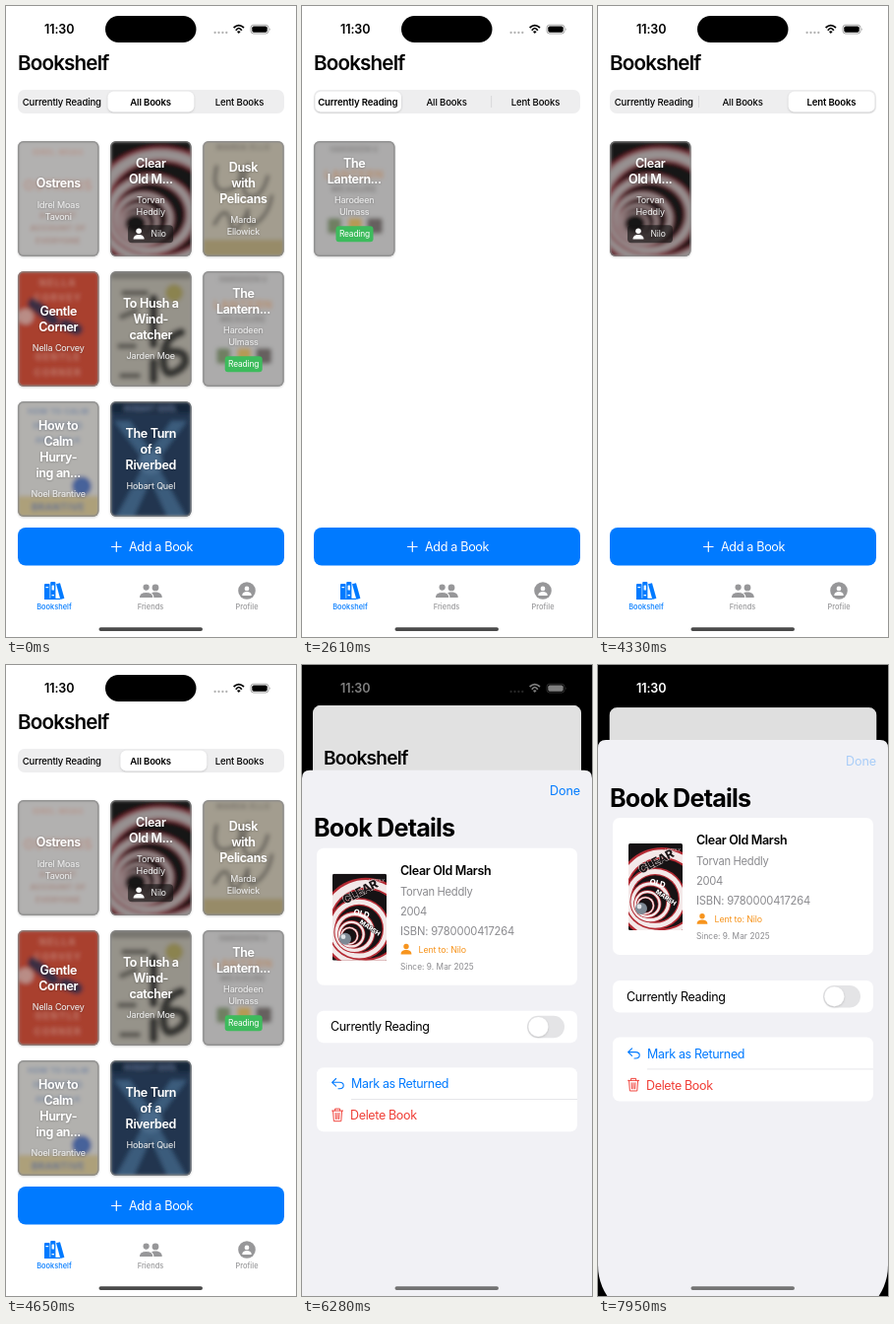
Animation of 295x640 px, one loop 8 s. Source, as an HTML page:

```html
<!DOCTYPE html>
<html lang="en">
<head>
<meta charset="utf-8">
<title>Bookshelf</title>
<style>
html, body { margin: 0; width: 100%; height: 100%; overflow: hidden; background: #000; }
svg { display: block; width: 100%; height: 100%; }
text { font-family: Inter, "Liberation Sans", sans-serif; white-space: pre; }
</style>
</head>
<body>
<svg id="stage" viewBox="0 0 295 640"></svg>
<script>
const BLUE = '#007aff', GRAY = '#8a8a8e', TAB = '#979799';

const rect = (x, y, w, h, fill, r = 0, more = '') =>
  `<rect x="${x}" y="${y}" width="${w}" height="${h}" rx="${r}" fill="${fill}" ${more}/>`;
const circle = (x, y, r, fill) => `<circle cx="${x}" cy="${y}" r="${r}" fill="${fill}"/>`;
const path = (d, fill, more = '') => `<path d="${d}" fill="${fill}" ${more}/>`;
const line = (d, stroke, w = 1) =>
  path(d, 'none', `stroke="${stroke}" stroke-width="${w}" stroke-linecap="round" stroke-linejoin="round"`);

function text(x, y, size, str, { fill = '#000', weight = 400, anchor = 'start', track, more = '' } = {}) {
  track ??= size > 10 ? -.027 : -.016;
  return `<text x="${x}" y="${y}" font-size="${size}" font-weight="${weight}" fill="${fill}" ` +
    `text-anchor="${anchor}" letter-spacing="${track}em" ${more}>${str}</text>`;
}

const person = (x, y, s, fill) => `<g transform="translate(${x} ${y}) scale(${s})">` +
  circle(0, -2.8, 2.7, fill) + path('M-5.4 5.2C-5.4 2-3 .8 0 .8S5.4 2 5.4 5.2Z', fill) + '</g>';

// Cover art in an 82.5 x 117 box
const words = (fill, rows, track = .04) => rows.map(([y, size, str]) =>
  text(41, y, size, str, { fill, weight: 700, anchor: 'middle', track })).join('');

// Nested bands that shrink toward the lower left
function swirl(light, red, dark) {
  let s = rect(0, 0, 55, 88, dark);
  for (let i = 0; i < 5; i++) {
    const r = 47 * .67 ** i, x = 13 + 21 * .67 ** i, y = 66 - 15 * .67 ** i;
    s += circle(x, y, r, red) + circle(x, y, r * .95, light) +
      circle(x, y, r * .79, red) + circle(x, y, r * .75, dark);
  }
  return s;
}

const art = {
  bones: rect(0, 0, 83, 117, '#b2b1b0') +
    words('#b5958b', [[14, 8, 'IDREL MOAS'], [50, 14, 'OSTRENS']]) +
    words('#a6877e', [[78, 8, 'A SHORT'], [91, 8, 'ACCOUNT OF'], [104, 8, 'EVERYONE']]),
  rings: '<g transform="scale(1.5 1.33)">' + swirl('#979191', '#7d2631', '#181617') + '</g>',
  reeds: rect(0, 0, 83, 117, '#a39d8f') + rect(0, 100, 83, 17, '#978b68') +
    words('#77726a', [[9, 8, 'MARDA ELLO']]) +
    line('M14 26q-6 26 10 24t14-22M46 24q-10 30 2 32t18-20M12 84q12-22 16-2t18-12q-2 22 10 12t14-26', '#6a665f', 4),
  brick: rect(0, 0, 83, 117, '#a93f2e') + circle(8, 46, 8, '#b98d86') +
    line('M16 33l20 17M48 54l12 5', '#3b2d42', 12) +
    words('#c27a6b', [[15, 9, 'NELLA'], [30, 9, 'CORVEY'], [90, 9, 'GENTLE'], [106, 9, 'CORNER']], .2),
  ink: rect(0, 0, 83, 117, '#96938a') + rect(0, 0, 83, 8, '#77756e') + circle(65, 22, 9, '#8b8350') +
    line('M14 22h22M12 46l14-6M10 76h14M12 106h16', '#5f5d57', 6) +
    line('M44 28v46M44 92v18M72 62Q54 68 54 88t12 14 10-14-18-6', '#393834', 9),
  coins: rect(0, 0, 83, 117, '#acabab') +
    words('#7d7b7a', [[11, 7, 'HARODEEN U']]) + words('#b5906f', [[38, 12, 'LANTERN']]) +
    words('#817f7e', [[52, 9, 'MEASURE']]) + rect(14, 78, 14, 16, '#6f7f62', 3) +
    rect(35, 78, 14, 16, '#b59a55', 3) + rect(54, 78, 16, 16, '#66615e', 3),
  calm: rect(0, 0, 83, 117, '#b2b1ae') +
    words('#7788a3', [[13, 8, 'HOW TO CALM'], [28, 9, 'HURRYING'], [42, 8, 'AND WALK']]) +
    circle(65, 86, 10, '#47629a') + rect(0, 96, 83, 21, '#ada07a') +
    words('#5f7194', [[111, 10, 'BRANTIVE']]),
  night: rect(0, 0, 83, 117, '#20344f') + path('M4 20L36 62 6 117H24L41 80 58 117H77L46 62 78 20H62L41 50 20 20Z', '#3b5b7c') +
    circle(41, 62, 12, '#4a6b8b') + rect(0, 0, 83, 12, '#18263b') +
    words('#5d7396', [[10, 7, 'HOBART QUEL']])
};

const books = [
  { title: ['Ostrens'], by: ['Idrel Moas', 'Tavoni'], art: 'bones' },
  { title: ['Clear', 'Old M...'], by: ['Torvan', 'Heddly'], art: 'rings', lent: 'Nilo' },
  { title: ['Dusk', 'with', 'Pelicans'], by: ['Marda', 'Ellowick'], art: 'reeds' },
  { title: ['Gentle', 'Corner'], by: ['Nella Corvey'], art: 'brick' },
  { title: ['To Hush a', 'Wind-', 'catcher'], by: ['Jarden Moe'], art: 'ink' },
  { title: ['The', 'Lantern...'], by: ['Harodeen', 'Ulmass'], art: 'coins', reading: true },
  { title: ['How to', 'Calm', 'Hurry-', 'ing an...'], by: ['Noel Brantive'], art: 'calm' },
  { title: ['The Turn', 'of a', 'Riverbed'], by: ['Hobart Quel'], art: 'night' }
];

function card(book, i) {
  const { title, by, lent, reading } = book, badge = lent || reading;
  const lead = 15.7, small = 12, cx = 41.2;
  let y = (117 - title.length * lead - 8 - by.length * small - (badge ? 24 : 0)) / 2;
  let s = `<g transform="translate(${12 + 94.1 * (i % 3)} ${137 + 132 * Math.floor(i / 3)})">` +
    rect(0, 0, 82.5, 117, '#999', 6, 'filter="url(#soft)"') +
    `<g clip-path="url(#cardClip)"><g filter="url(#blur)">${art[book.art]}</g>` +
    rect(0, 0, 82.5, 117, 'none', 6, 'stroke="#858585" stroke-width="3" opacity=".6"') + '</g>';
  const put = (rows, step, size, fill, weight) => rows.forEach(row => {
    s += text(cx, y + step / 2 + size * .36, size, row,
      { fill, weight, anchor: 'middle', more: 'filter="url(#glow)"' });
    y += step;
  });
  put(title, lead, 12.5, '#fff', 600);
  y += 8;
  put(by, small, 9, '#ececec', 400);
  y += 8;
  if (reading) {
    s += rect(22.5, y, 38, 16, '#3dbb5c', 3) +
      text(41.5, y + 11, 8.4, 'Reading', { fill: '#fff', anchor: 'middle' });
  }
  if (lent) {
    s += rect(18, y - 1, 46, 18, '#161414', 4, 'opacity=".65"') + person(29, y + 8, 1.02, '#fff') +
      text(41.5, y + 11.2, 8.6, lent, { fill: '#f2f2f2' });
  }
  return s + '</g>';
}

const shelves = [books.filter(b => b.reading), books, books.filter(b => b.lent)];
const segX = i => 13.4 + 90.2 * i;

const tabs = rect(39, 586, 5.6, 16, BLUE, 1) + rect(45.2, 584, 5.2, 18, BLUE, 1) +
  rect(40.4, 589, 2.8, 1.2, '#fff') + rect(46.6, 587.5, 2.4, 5, '#fff', .6) + rect(46.6, 597, 2.4, 1.3, '#fff') +
  path('M51 586.2l4-1 4.4 15.6-4 1.1Z', BLUE) + rect(39, 600.8, 16, 1.2, BLUE) +
  person(152, 593.4, 1.25, TAB) +
  `<g stroke="#fff" stroke-width=".8">${person(142.6, 593.4, 1.35, TAB)}</g>` +
  circle(245, 593, 8.8, TAB) + person(245, 593.4, .88, '#fff') +
  [['Bookshelf', 49, BLUE], ['Friends', 147, TAB], ['Profile', 245, TAB]].map(([s, x, fill]) =>
    text(x, 612.4, 7.4, s, { fill, weight: 500, anchor: 'middle', track: .005 })).join('');

const home = rect(0, 0, 295, 640, '#fff') +
  text(12, 65, 20.6, 'Bookshelf', { weight: 600, track: -.04 }) +
  rect(12, 85, 271, 24, '#eeeeef', 7) +
  [0, 1].map(i => rect(102 + 90.3 * i, 91, .8, 12, '#d2d2d5', 0, `id="rule${i}"`)).join('') +
  rect(0, 86.8, 87.6, 20.4, '#fff', 5.5, 'id="pill" filter="url(#soft)"') +
  ['Currently Reading', 'All Books', 'Lent Books'].map((s, i) =>
    text(56.8 + 90.3 * i, 100.6, 9.6, s, { weight: 500, anchor: 'middle', more: `id="seg${i}"` })).join('') +
  shelves.map((list, i) => `<g id="shelf${i}">${list.map(card).join('')}</g>`).join('') +
  rect(12, 529, 271, 38.5, BLUE, 8) + line('M107.5 548.5h9.6M112.3 543.7v9.6', '#fff', 1.2) +
  text(125, 553, 12.6, 'Add a Book', { fill: '#fff' }) +
  tabs + rect(0, 0, 295, 640, '#000', 0, 'id="dim"');

// Sheet, with y measured from its top edge
const cover = '<g transform="translate(31 105)" clip-path="url(#coverClip)">' +
  swirl('#f3e9e9', '#b32a33', '#161214') +
  text(53, 8, 4, 'HEDDLY', { fill: '#ddd', anchor: 'end', track: 0 }) +
  text(13, 31, 12, 'CLEAR', { weight: 800, fill: '#1b1416', more: 'transform="rotate(-28 13 31)" stroke="#f3e9e9" stroke-width=".8" paint-order="stroke"' }) +
  text(21, 41, 8, 'OLD', { weight: 800, fill: '#fff', more: 'transform="rotate(14 21 41)"' }) +
  text(27, 50, 6.4, 'MARSH', { weight: 800, fill: '#fff', more: 'transform="rotate(34 27 50)" stroke="#161214" stroke-width=".8" paint-order="stroke"' }) +
  circle(13, 66, 6, '#7d8994') + circle(11, 64, 2.4, '#dfe4e8') + '</g>';

const sheet = path('M0 8Q0 0 8 0H287Q295 0 295 8V533A56 56 0 0 1 239 589H56A56 56 0 0 1 0 533Z', '#f1f1f5') +
  text(283, 25.6, 12.6, 'Done', { fill: BLUE, anchor: 'end', track: -.01, more: 'id="done"' }) +
  text(12, 67.8, 25.2, 'Book Details', { weight: 700, track: -.032 }) +
  rect(15, 79, 265, 139, '#fff', 7) + cover +
  text(100, 106.3, 12.5, 'Clear Old Marsh', { weight: 600 }) +
  text(100, 127, 11.2, 'Torvan Heddly', { fill: GRAY }) +
  text(100, 147.2, 11.2, '2004', { fill: GRAY }) +
  text(100, 167.2, 11.2, 'ISBN: 9780000417264', { fill: GRAY, track: -.015 }) +
  person(106, 181.6, 1, '#f7941d') +
  text(118.5, 185, 8.9, 'Lent to: Nilo', { fill: '#f7941d' }) +
  text(100, 202, 8.3, 'Since: 9. Mar 2025', { fill: GRAY, track: .005 }) +
  rect(15, 244, 265, 32.5, '#fff', 7) + text(29, 264.8, 12.5, 'Currently Reading') +
  rect(229, 249, 38, 22.5, '#e4e4e6', 11.2) +
  `<g filter="url(#soft)">${circle(240.4, 260.2, 10, '#fff')}</g>` +
  rect(15, 301.5, 265, 65, '#fff', 7) + rect(50, 333.6, 230, .7, '#dcdce0') +
  line('M34.6 312.8l-4 3.8 4 3.8M30.8 316.6h7.4q4 0 4 3.2t-4 3.2h-1.2', BLUE, 1.1) +
  text(50, 322.6, 12.5, 'Mark as Returned', { fill: BLUE }) +
  line('M30.6 345.4h11M33.6 345.2v-1.8h5v1.8M31.6 345.6l.8 10.4h7.4l.8-10.4M34.2 347.8l.3 6M36.1 347.8v6M38 347.8l-.3 6', '#f03e36', .95) +
  text(49, 354.6, 12.5, 'Delete Book', { fill: '#f03e36' });

const status = text(39, 28.2, 12.6, '11:30', { weight: 600, track: -.01, more: 'id="clock"' }) +
  rect(101, 10, 92.5, 27, '#000', 13.5) +
  '<g id="signs" fill="#000" stroke="#000" stroke-width="0">' +
  [0, 1, 2, 3].map(i => `<circle cx="${212.6 + 3.9 * i}" cy="27" r="1.15" opacity=".3"/>`).join('') +
  [[5.2, 20.8], [3, 23.6]].map(([w, y]) =>
    `<path d="M${236.8 - w} ${y + 1.2}Q236.8 ${y - 3.4} ${236.8 + w} ${y + 1.2}" fill="none" stroke-width="1.7"/>`).join('') +
  '<path d="M236.8 28l-1.9-2.1q1.9-1.5 3.8 0Z"/>' +
  '<rect x="249" y="19.2" width="18" height="8.8" rx="2.8" fill="none" stroke-width=".8" opacity=".45"/>' +
  '<rect x="250.3" y="20.5" width="15.4" height="6.2" rx="1.7"/>' +
  '<path d="M268.3 22.2q1.4 1.4 0 2.8Z" opacity=".45"/></g>';

const stage = document.getElementById('stage');
stage.innerHTML = `<defs>
  <clipPath id="cardClip"><rect width="82.5" height="117" rx="6"/></clipPath>
  <clipPath id="coverClip"><rect width="55" height="88" rx="1.5"/></clipPath>
  <clipPath id="homeClip"><rect id="homeShape" width="295" height="640"/></clipPath>
  <filter id="blur"><feGaussianBlur stdDeviation="2.3"/></filter>
  <filter id="soft"><feDropShadow dx="0" dy=".8" stdDeviation="1" flood-opacity=".2"/></filter>
  <filter id="glow"><feDropShadow dx="0" dy=".4" stdDeviation=".8" flood-opacity=".35"/></filter>
</defs>` + rect(0, 0, 295, 640, '#000') +
  `<g id="home" clip-path="url(#homeClip)">${home}</g><g id="sheet">${sheet}</g>${status}` +
  rect(94.5, 630.2, 105.5, 3.8, '#4a4a4c', 1.9, 'id="bar"');

const el = {};
stage.querySelectorAll('[id]').forEach(n => el[n.id] = n);
const set = (id, attrs) => { for (const k in attrs) el[id].setAttribute(k, attrs[k]); };

const LOOP = 8000;
const OPEN = 6060, PRESS = 7830, CLOSE = 7932;
const taps = [[-1000, 1], [560, 0], [2670, 2], [4390, 1]];
const bursts = [[500, 103], [2610, 115], [4330, 108], [OPEN, 110], [PRESS, 120]];

const clamp = v => Math.max(0, Math.min(1, v));
const mix = (a, b, k) => a + (b - a) * k;
const grey = v => `rgb(${[v, v, v].map(Math.round)})`;

function spring(ms, speed) {
  const x = Math.max(0, ms) / 1000 * speed;
  return 1 - (1 + x) * Math.exp(-x);
}

function snap(t) {
  const burst = bursts.filter(b => b[0] <= t).pop();
  return burst ? burst[0] + Math.floor((t - burst[0]) / burst[1]) * burst[1] : 0;
}

function draw(time) {
  const t = snap(time);

  const n = taps.filter(tap => tap[0] <= t).length - 1;
  const [start, tab] = taps[n], from = taps[Math.max(0, n - 1)][1];
  set('pill', { x: mix(segX(from), segX(tab), spring(t - start, 22)) });
  for (let i = 0; i < 3; i++) {
    set('shelf' + i, { display: i === tab ? 'inline' : 'none' });
    set('seg' + i, { 'font-weight': i === tab ? 600 : 500 });
  }
  set('rule0', { opacity: tab === 2 ? 1 : 0 });
  set('rule1', { opacity: tab === 0 ? 1 : 0 });

  const p = spring(t - OPEN, 18) * (1 - spring(t - CLOSE, 18));
  const scale = 1 - 24 / 295 * p;
  set('home', { transform: `translate(${12 * p} ${45 * p}) scale(${scale})` });
  set('homeShape', { rx: t < OPEN ? 0 : mix(56, 8, clamp(p * 1.1)) / scale });
  set('dim', { opacity: .13 * p });
  set('sheet', { transform: `translate(0 ${mix(640, 51, p)})`, display: p > 0 ? 'inline' : 'none' });
  set('done', { opacity: t >= PRESS ? .3 : 1 });

  const lit = clamp((t - 6170) / 220), ink = grey(255 * lit);
  const signs = grey(255 * lit * (1 - clamp((t - PRESS) / 120)));
  set('clock', { fill: ink });
  set('signs', { fill: signs, stroke: signs });
  set('bar', { fill: grey(mix(74, 118, p)) });
}

const origin = performance.now();
function tick() {
  draw((performance.now() - origin) % LOOP);
  requestAnimationFrame(tick);
}
tick();
</script>
</body>
</html>
```
